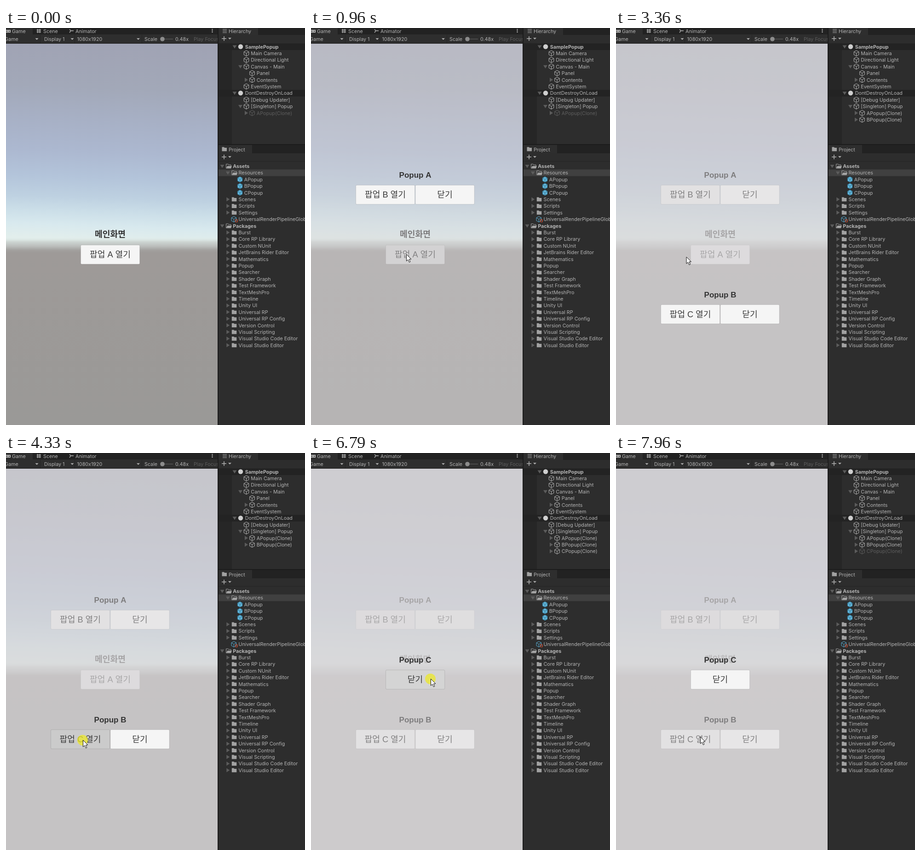
Recreate the animation shown at these times as an HTML page with a canvas. Size 650x862 px, loop 8000 ms.

```html
<!DOCTYPE html>
<html lang="ko">
<head>
<meta charset="utf-8">
<style>
html, body { margin: 0; width: 100%; height: 100%; overflow: hidden; background: #2d2d2d; }
canvas { display: block; }
</style>
</head>
<body>
<canvas id="stage" width="650" height="862"></canvas>
<script>
const ctx = document.getElementById('stage').getContext('2d');
const LOOP = 8000, STEP = 70, ROW = 14.4;
const UI = '10.74px Inter, Roboto, sans-serif';
const GAME = '"Liberation Sans", "Noto Sans CJK KR", "Noto Sans CJK", sans-serif';
const LIGHT = '#b4b4b4', ICON = '#a2a2a2', DIM = '#5e5e5e';

function rect(x, y, w, h, color) {
  ctx.fillStyle = color;
  ctx.fillRect(x, y, w, h);
}

function text(str, x, y, color = LIGHT, font = UI, align = 'left') {
  ctx.font = font;
  ctx.textAlign = align;
  ctx.textBaseline = 'alphabetic';
  ctx.fillStyle = color;
  ctx.fillText(str, x, y);
}

function poly(points, fill, stroke, width = 1) {
  ctx.beginPath();
  points.forEach(([x, y]) => ctx.lineTo(x, y));
  ctx.closePath();
  if (fill) { ctx.fillStyle = fill; ctx.fill(); }
  if (stroke) { ctx.strokeStyle = stroke; ctx.lineWidth = width; ctx.stroke(); }
}

function lines(color, width, ...segments) {
  ctx.beginPath();
  for (const [x1, y1, x2, y2] of segments) { ctx.moveTo(x1, y1); ctx.lineTo(x2, y2); }
  ctx.strokeStyle = color;
  ctx.lineWidth = width;
  ctx.stroke();
}

function disc(x, y, r, color) {
  ctx.beginPath();
  ctx.arc(x, y, r, 0, 7);
  ctx.fillStyle = color;
  ctx.fill();
}

// Icons
const caret = (x, y, r = 3.5) => poly([[x - r, y - r / 2], [x + r, y - r / 2], [x, y + r / 2]], LIGHT);

function foldout(x, y, open) {
  if (open) poly([[x - 4.5, y - 3], [x + 4.5, y - 3], [x, y + 4]], '#5c5c5c');
  else poly([[x - 3, y - 4.5], [x + 4, y], [x - 3, y + 4.5]], '#5c5c5c');
}

function cube(x, y, line, fill) {
  const hex = [[x, y - 6], [x + 5.3, y - 3.2], [x + 5.3, y + 3.2], [x, y + 6], [x - 5.3, y + 3.2], [x - 5.3, y - 3.2]];
  poly(hex, fill, line);
  lines(line, 1, [x, y, x, y + 6], [x, y, x - 5, y - 3], [x, y, x + 5, y - 3]);
}

function folder(x, y, open) {
  const body = [[x - 5.5, y - 4.5], [x - 1, y - 4.5], [x, y - 3], [x + 5, y - 3], [x + 5, y + 4.5], [x - 5.5, y + 4.5]];
  if (!open) return poly(body, ICON);
  poly(body, null, ICON);
  poly([[x - 3, y - 0.5], [x + 7, y - 0.5], [x + 5, y + 4.5], [x - 5, y + 4.5]], ICON);
}

function plus(y) {
  lines(LIGHT, 1.5, [469, y, 479, y], [474, y - 5, 474, y + 5]);
  caret(486.5, y);
}

// Editor chrome
function drawToolbars() {
  rect(0, 0, 460, 14, '#222');
  rect(0, 0, 58, 14, '#2e2e2e');
  rect(0, 14, 460, 20, '#2e2e2e');
  rect(0, 33, 460, 1, '#1c1c1c');
  rect(0, 4, 10, 6, LIGHT);
  disc(2, 7, 1.2, '#2e2e2e');
  disc(7, 7, 1.2, '#2e2e2e');
  text('Game', 13, 11);
  lines(LIGHT, 1.3, [69, 2, 69, 11], [73.5, 2, 73.5, 11], [66.5, 4.5, 76, 4.5], [66.5, 8.5, 76, 8.5]);
  text('Scene', 81, 11);
  lines(LIGHT, 1.3, [138, 3, 141, 6], [141, 6, 147, 6], [141, 6, 138, 10]);
  text('Animator', 151, 11);
  for (const y of [2, 5, 8]) rect(447.5, y, 2, 2, LIGHT);

  text('Game', -3, 28);
  text('Display 1', 83, 28);
  text('1080x1920', 154.5, 28);
  [67, 144, 287.5].forEach(x => caret(x, 24));
  for (const x of [74, 149, 295]) rect(x, 15, 1, 18, '#252525');
  text('Scale', 301, 28);
  rect(340, 23.5, 23, 1, '#686868');
  disc(340, 24, 4.8, '#8c8c8c');
  text('0.48x', 368, 28);
  ctx.save();
  ctx.beginPath();
  ctx.rect(400, 14, 60, 20);
  ctx.clip();
  text('Play Focused', 408, 28, DIM);
  ctx.restore();
}

function drawPanel(top, tabWidth, title) {
  rect(462, top, 188, 18, '#222');
  rect(462, top, tabWidth, 18, '#2e2e2e');
  text(title, 484, top + 13.5);
}

const hierarchy = [
  ['SamplePopup', 0, 'open'], ['Main Camera', 1], ['Directional Light', 1],
  ['Canvas - Main', 1, 'open'], ['Panel', 2], ['Contents', 2, 'closed'],
  ['EventSystem', 1], ['DontDestroyOnLoad', 0, 'open'], ['[Debug Updater]', 1],
  ['[Singleton] Popup', 1, 'open']
];

function drawHierarchy(t) {
  rect(462, 0, 188, 252, '#2d2d2d');
  drawPanel(-3, 86, 'Hierarchy');
  for (const y of [3, 6.5, 10]) rect(471, y - 0.5, 9, 1, LIGHT);
  plus(23);
  rect(462, 33, 29, 219, '#262626');
  const rows = [...hierarchy, ['APopup(Clone)', 2, 'closed', t < 1030]];
  if (t >= 2940) rows.push(['BPopup(Clone)', 2, 'closed']);
  if (t >= 4470) rows.push(['CPopup(Clone)', 2, 'closed', t >= 6930]);
  rows.forEach(([name, depth, fold, dim], i) => {
    const x = 510 + depth * 12.5, y = 40.5 + i * ROW;
    const color = dim ? DIM : LIGHT;
    if (!depth) {
      rect(462, y - 7, 188, ROW, '#232323');
      disc(x, y, 5.2, '#cfcfcf');
    } else cube(x, y, color);
    if (fold) foldout(x - 13, y, fold === 'open');
    text(name, x + 9.8, y + 4, color, (i ? '' : 'bold ') + UI);
  });
}

const packages = ['Burst', 'Core RP Library', 'Custom NUnit', 'JetBrains Rider Editor', 'Mathematics',
  'Popup', 'Searcher', 'Shader Graph', 'Test Framework', 'TextMeshPro', 'Timeline', 'Unity UI',
  'Universal RP', 'Universal RP Config', 'Version Control', 'Visual Scripting',
  'Visual Studio Code Editor', 'Visual Studio Editor'];
const project = [
  ['Assets', 0, 'open'], ['Resources', 1, 'open'],
  ...['APopup', 'BPopup', 'CPopup'].map(n => [n, 2, 'prefab']),
  ...['Scenes', 'Scripts', 'Settings'].map(n => [n, 1, 'closed']),
  ['UniversalRenderPipelineGlobalSettings', 1, 'asset'],
  ['Packages', 0, 'open'], ...packages.map(n => [n, 1, 'closed'])
];

function drawProject() {
  rect(462, 252, 188, 610, '#2d2d2d');
  rect(462, 252, 188, 2, '#1c1c1c');
  drawPanel(254, 73, 'Project');
  folder(475, 263);
  plus(280);
  rect(462, 289, 188, 1, '#242424');
  rect(462, 307.2, 188, ROW, '#404040');
  project.forEach(([name, depth, kind], i) => {
    const x = 484 + depth * 12.3, y = 300 + i * ROW;
    if (kind === 'prefab') cube(x, y, '#2f6f8c', '#62b5d9');
    else if (kind === 'asset') {
      cube(x - 1, y, '#58a9cd');
      text('{}', x + 1, y + 6, '#e8512f', 'bold 8px Inter, sans-serif');
    } else {
      folder(x, y, kind === 'open');
      foldout(x - 14, y, kind === 'open');
    }
    text(name, x + 9.2, y + 4, LIGHT, (depth ? '' : 'bold ') + UI);
  });
}

// Game view
function gradient(y1, y2, stops) {
  const g = ctx.createLinearGradient(0, y1, 0, y2);
  stops.forEach(([y, rgb]) => g.addColorStop((y - y1) / (y2 - y1), `rgba(${rgb})`));
  return g;
}

const sky = gradient(34, 460, [[34, '160,163,180'], [130, '162,168,184'], [200, '167,176,197'],
  [270, '172,184,208'], [325, '179,196,218'], [370, '190,209,225'], [400, '203,222,232'],
  [430, '216,233,238'], [460, '226,238,236']]);
const horizon = gradient(454, 488, [[454, '226,238,235,0'], [464, '206,214,211'], [474, '186,189,187'],
  [482, '163,161,159'], [488, '157,154,152']]);
const ground = gradient(488, 862, [[488, '158,154,152'], [862, '154,153,151']]);

function drawScene() {
  ctx.save();
  ctx.transform(1, 0.035, 0, 1, 0, -8);
  rect(0, 0, 460, 490, sky);
  ctx.restore();
  rect(0, 454, 460, 34, horizon);
  rect(0, 488, 460, 374, ground);
}

function button(label, x, y, level = 245) {
  ctx.beginPath();
  ctx.roundRect(x + 0.5, y + 0.2, 128.2, 41.6, 2);
  ctx.fillStyle = `rgb(${level},${level},${level})`;
  ctx.fill();
  ctx.strokeStyle = 'rgba(60,60,60,.16)';
  ctx.lineWidth = 1;
  ctx.stroke();
  text(label, x + 64.5, y + 27, '#3a3a3a', '300 18.2px ' + GAME, 'center');
}

const title = (str, y, size = 17) => text(str, 226.5, y, '#343434', `bold ${size}px ` + GAME, 'center');
const veil = () => rect(0, 34, 460, 828, 'rgba(213,211,213,.46)');

// Last value whose time has come
const at = (t, ...keys) => keys.reduce((v, [time, value]) => t >= time ? value : v, 245);
const press = start => [[start, 212], [start + 70, 203], [start + 140, 209], [start + 210, 235]];

function drawGame(t) {
  drawScene();
  title('메인화면', 454, 18.2);
  button('팝업 A 열기', 162, 471, at(t, [610, 235], ...press(820)));
  if (t >= 960) {
    veil();
    title('Popup A', 325);
    button('팝업 B 열기', 97, 341, at(t, [1930, 235], ...press(2730)));
    button('닫기', 226.5, 341);
  }
  if (t >= 2870) {
    veil();
    title('Popup B', 584.5);
    button('팝업 C 열기', 97, 600.5,
      at(t, [3920, 235], ...press(4260), [6860, 245], [7550, 235], [7820, 212], [7890, 209], [7960, 235]));
    button('닫기', 226.5, 600.5);
  }
  if (t >= 4400 && t < 6860 || t >= 7890) {
    veil();
    title('Popup C', 455);
    button('닫기', 162, 471, at(t, [5690, 235], [6790, 212], [6860, 245]));
  }
}

// Pointer: start time, steps, end x, end y, sideways bow
const moves = [
  [190, 9, 207, 491, 0], [1370, 11, 188, 365, 17], [3010, 8, 146, 521, 0], [3570, 8, 167, 623, 0],
  [5200, 12, 226, 492, 0], [6040, 6, 260, 490, 0], [7130, 6, 187, 606, 0], [7550, 4, 183, 616, 0]
];
const clicks = [[820, 960], [2730, 2870], [4260, 4400], [6790, 6860], [7820, 7890]];

function pointer(t) {
  let x = 376, y = 757;
  for (const [start, steps, x2, y2, bow] of moves) {
    if (t < start) break;
    const p = Math.min(1, (Math.floor((t - start) / STEP) + 1) / steps);
    const e = p * p * (3 - 2 * p);
    x += (x2 - x) * e + bow * Math.sin(Math.PI * e);
    y += (y2 - y) * e;
  }
  return [x, y];
}

function drawPointer(t) {
  if (t < 130) return;
  const [x, y] = pointer(t);
  if (clicks.some(([a, b]) => t >= a && t < b)) disc(x - 0.5, y + 0.5, 11.5, 'rgba(236,232,40,.75)');
  const shape = [[0, 0], [0, 14.5], [3.4, 11.5], [6, 17.2], [8.4, 16.1], [5.9, 10.6], [10.4, 10.4]];
  poly(shape.map(([dx, dy]) => [x + 0.5 + dx, y + 0.5 + dy]), '#fff', '#111');
}

function frame(now) {
  const t = now % LOOP;
  rect(0, 0, 650, 862, '#1c1c1c');
  drawGame(t);
  drawToolbars();
  rect(460, 0, 2, 862, '#1c1c1c');
  drawHierarchy(t);
  drawProject();
  drawPointer(t);
  requestAnimationFrame(frame);
}
requestAnimationFrame(frame);
</script>
</body>
</html>
```
